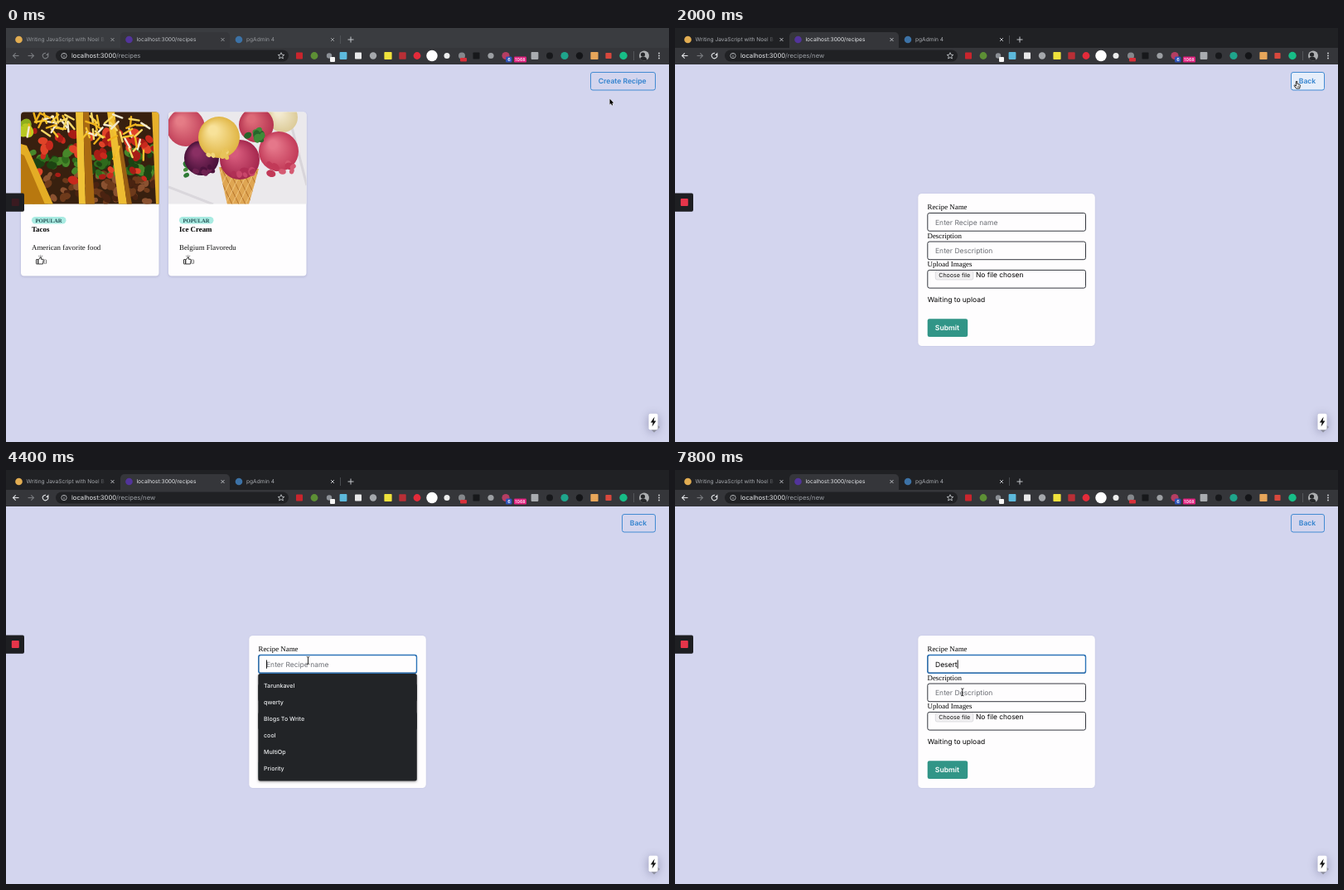
An HTML page with a canvas for the animation above (8 s loop, 800x500 px).

```html
<!DOCTYPE html>
<html lang="en">
<head>
<meta charset="utf-8">
<title>Recipes</title>
<style>
html, body { margin: 0; width: 100%; height: 100%; overflow: hidden; background: #d3d5ee; }
canvas { display: block; width: 800px; height: 500px; }
</style>
</head>
<body>
<canvas id="stage" width="800" height="500"></canvas>
<script>
const ctx = document.getElementById('stage').getContext('2d');
const LOOP = 8000, STEP = 200;
const SANS = 'Inter, "Open Sans", sans-serif';
const SERIF = '"Liberation Serif", "Noto Serif", serif';
const BLUE = '#3182ce';

// ---------- helpers ----------
function text(str, x, y, size, color, family = SANS, weight = 400) {
  ctx.font = `${weight} ${size}px ${family}`;
  ctx.fillStyle = color;
  ctx.fillText(str, x, y);
  return ctx.measureText(str).width;
}
function box(x, y, w, h, r, fill, stroke, line = 1) {
  ctx.beginPath();
  ctx.roundRect(x, y, w, h, r);
  paint(fill, stroke, line);
}
function disc(x, y, r, fill, stroke, line = 1) {
  ctx.beginPath();
  ctx.arc(x, y, r, 0, Math.PI * 2);
  paint(fill, stroke, line);
}
function poly(points, fill, stroke, line = 1, open = false) {
  ctx.beginPath();
  points.forEach(([x, y]) => ctx.lineTo(x, y));
  if (!open) ctx.closePath();
  paint(fill, stroke, line);
}
function paint(fill, stroke, line) {
  if (fill) { ctx.fillStyle = fill; ctx.fill(); }
  if (stroke) { ctx.strokeStyle = stroke; ctx.lineWidth = line; ctx.stroke(); }
}
function line(x1, y1, x2, y2, color, width = 1) {
  poly([[x1, y1], [x2, y2]], null, color, width, true);
}
function shadow(color, blur, dy, draw) {
  ctx.save();
  ctx.shadowColor = color;
  ctx.shadowBlur = blur;
  ctx.shadowOffsetY = dy;
  draw();
  ctx.restore();
}
function clipped(x, y, w, h, r, draw) {
  ctx.save();
  ctx.beginPath();
  ctx.roundRect(x, y, w, h, r);
  ctx.clip();
  draw();
  ctx.restore();
}
function at(x, y, draw) {
  ctx.save();
  ctx.translate(x, y);
  draw();
  ctx.restore();
}
function seeded(seed) {
  return () => (seed = (seed * 16807) % 2147483647) / 2147483647;
}

// ---------- browser window ----------
function drawTab(x, title, icon, color, focused) {
  disc(x + 4.5, 14, 4.3, icon);
  text(title, x + 13.5, 16.4, 6.6, color);
  const cx = x + 117.5, ink = focused ? '#c3c6ca' : '#9a9da1';
  line(cx - 2, 12, cx + 2, 16, ink, 0.9);
  line(cx + 2, 12, cx - 2, 16, ink, 0.9);
}
function drawArrow(x, dir, color) {
  line(x - 3.5, 33.5, x + 3.5, 33.5, color, 1.1);
  poly([[x + dir * 0.3, 30.3], [x + dir * 3.5, 33.5], [x + dir * 0.3, 36.7]], null, color, 1.1, true);
}
function drawStar(x, y, r, color) {
  const pts = Array.from({ length: 10 }, (_, i) => {
    const a = i * Math.PI / 5 - Math.PI / 2, d = i % 2 ? r * 0.45 : r;
    return [x + d * Math.cos(a), y + d * Math.sin(a)];
  });
  poly(pts, null, color, 0.8);
}
function drawExtensions() {
  const squares = [[354, '#c9252d', 4], [407, '#5db9dc', 4.4], [425, '#e9e9ea', 4], [461, '#efe13c', 4.6],
    [478.5, '#b92f36', 4.2], [567.5, '#17181b', 4], [638, '#a9acb0', 4.4], [710, '#e7a65a', 4.6], [727, '#d8483d', 3.6]];
  const discs = [[372, '#5d8f35', 4.4], [390, '#8d9197', 3.2], [443, '#a5a8ac', 4.2], [496, '#e42b3a', 4.4],
    [514, '#ffffff', 6.7], [532, '#eceded', 3.5], [550, '#85888c', 4], [585, '#9c9fa3', 3.6],
    [603, '#b53e62', 4.6], [656, '#17181b', 4], [674, '#1fa58c', 4.6], [692, '#141518', 4.2], [745, '#17bd87', 4.7]];
  squares.forEach(([x, color, r]) => box(x - r, 33.5 - r, r * 2, r * 2, 0.8, color));
  discs.forEach(([x, color, r]) => disc(x, 33.5, r, color));
  box(391, 35, 6, 6, 1, '#f5f5f5');
  box(548, 36, 8, 4.5, 1, '#d8313b');
  box(603, 34.5, 7.5, 7, 1.5, '#2d52b8');
  text('6', 605.2, 40.2, 5.6, '#fff', SANS, 600);
  box(613, 34.5, 15, 7, 1.2, '#e0217f');
  text('1068', 614.3, 40.1, 5.3, '#fff', SANS, 500);
  line(757.5, 28, 757.5, 39, '#5c5f63', 0.8);
  clipped(764, 27.5, 12, 12, 6, () => {
    box(764, 27, 12, 13, 0, '#aeb0b2');
    disc(768.5, 32, 2.6, '#26272a');
    disc(769, 39, 4.5, '#26272a');
  });
  [-3, 0, 3].forEach(d => disc(788, 33.5 + d, 0.9, '#d5d7da'));
}
function drawBrowser(t) {
  const focused = t >= 1000;
  const frame = focused ? '#202124' : '#3a3c40';
  const title = focused ? '#a8abb0' : '#94979b';
  box(0, 0, 800, 44, 0, frame);
  box(0, 24, 800, 20, 0, '#35363a');
  box(138, 5, 132, 20, [5, 5, 0, 0], '#35363a');
  drawTab(11, 'Writing JavaScript with Noel B', '#e2ad52', title, focused);
  const fade = ctx.createLinearGradient(108, 0, 122, 0);
  fade.addColorStop(0, frame + '00');
  fade.addColorStop(1, frame);
  box(108, 8, 16, 12, 0, fade);
  drawTab(144, 'localhost:3000/recipes', '#52349b', focused ? '#e3e5e8' : '#b9bcc0', focused);
  drawTab(276.5, 'pgAdmin 4', '#3c72a6', title, focused);
  line(403.5, 9, 403.5, 19, '#55585c', 0.8);
  line(412.5, 14, 419.5, 14, '#c3c6ca', 1);
  line(416, 10.5, 416, 17.5, '#c3c6ca', 1);

  const nav = focused ? '#e0e2e5' : '#7b7e82';
  drawArrow(12, -1, nav);
  drawArrow(30, 1, '#77797d');
  ctx.beginPath();
  ctx.arc(47.5, 33.5, 3.2, -0.5, 4.9);
  ctx.strokeStyle = nav;
  ctx.lineWidth = 1.1;
  ctx.stroke();
  poly([[51.4, 29.6], [51.4, 33], [48, 33]], nav);

  box(60, 26.5, 281, 14, 7, '#202124');
  disc(70, 33.5, 3.2, null, '#c4c7cb', 0.8);
  line(70, 33, 70, 35.3, '#c4c7cb', 0.8);
  disc(70, 31.8, 0.5, '#c4c7cb');
  const w = text('localhost:3000', 79, 36.4, 7.65, '#e8eaed');
  text(t < 2000 ? '/recipes' : '/recipes/new', 79 + w, 36.4, 7.65, '#9ea2a8');
  drawStar(332, 33.7, 4, '#cfd2d6');
  drawExtensions();
}

// ---------- pictures ----------
function scatter(rnd, n, [x, y, w, h], colors, size) {
  for (let i = 0; i < n; i++) {
    const px = x + rnd() * w, py = y + rnd() * h, r = size * (0.6 + rnd() * 0.6);
    ctx.beginPath();
    ctx.ellipse(px, py, r, r * 0.75, rnd() * 3, 0, 7);
    paint(colors[i % colors.length]);
  }
}
function shreds(rnd, n, [x, y, w, h], colors) {
  ctx.lineCap = 'round';
  for (let i = 0; i < n; i++) {
    const px = x + rnd() * w, py = y + rnd() * h, a = rnd() * 3.1;
    line(px, py, px + Math.cos(a) * 12, py + Math.sin(a) * 12, colors[i % colors.length], 2.4);
  }
  ctx.lineCap = 'butt';
}
function drawTacos() {
  const rnd = seeded(77);
  const reds = ['#c8291d', '#e04328', '#a81c16'], greens = ['#2f6a1c', '#47872a', '#1d4312'];
  const browns = ['#6e3a1b', '#8a5130', '#4a2311'], cheese = ['#f5c22d', '#f7d866', '#f2ead0', '#eeb11c'];
  box(18, 101, 167, 112, 0, '#38200f');
  const fillings = [[32, 88], [98, 136], [146, 180]];
  fillings.forEach(([a, b]) => {
    const w = b - a;
    scatter(rnd, 26, [a, 176, w, 34], browns, 5);
    scatter(rnd, 22, [a, 146, w, 32], greens, 6);
    scatter(rnd, 12, [a, 122, w, 34], reds, 6);
    scatter(rnd, 3, [a, 170, w, 16], reds, 5.5);
  });
  poly([[18, 140], [25, 142], [57, 213], [18, 213]], '#e4ad25');
  poly([[18, 152], [22, 154], [47, 213], [18, 213]], '#b8780f');
  poly([[84, 101], [93, 101], [96, 213], [88, 213]], '#f0c236');
  poly([[93, 101], [100, 101], [107, 213], [96, 213]], '#a96a12');
  poly([[122, 101], [131, 101], [146, 213], [136, 213]], '#edbc31');
  poly([[131, 110], [136, 118], [152, 213], [146, 213]], '#9a5f14');
  poly([[176, 101], [185, 101], [185, 213], [181, 213]], '#e6b02b');
  scatter(rnd, 5, [18, 112, 8, 22], ['#b9c921', '#8fae1c'], 8);
  shreds(rnd, 26, [26, 101, 50, 24], cheese);
  shreds(rnd, 18, [96, 101, 34, 30], cheese);
  shreds(rnd, 22, [126, 106, 42, 42], cheese);
}
function drawScoop(x, y, r, light, dark) {
  const g = ctx.createRadialGradient(x - r * 0.3, y - r * 0.35, r * 0.2, x, y, r);
  g.addColorStop(0, light);
  g.addColorStop(1, dark);
  disc(x, y, r, g);
}
function drawIceCream() {
  const rnd = seeded(31);
  box(196, 101, 167, 112, 0, '#ebe9ec');
  line(340, 101, 363, 190, '#d8d5da', 3);
  line(196, 192, 250, 213, '#dad7dc', 3);
  drawScoop(334, 108, 18, '#f3ead0', '#dccb98');
  drawScoop(217, 120, 23, '#e57c86', '#c2425b');
  drawScoop(302, 117, 21, '#dd6a78', '#b63450');
  drawScoop(329, 149, 24, '#e5778a', '#c23a58');
  scatter(rnd, 8, [318, 164, 30, 12], ['#c23a58', '#d55a72'], 5);
  scatter(rnd, 10, [216, 148, 20, 36], ['#2e7a35', '#468f3b'], 5);
  scatter(rnd, 9, [288, 122, 22, 14], ['#3f8a38', '#26662b'], 5);
  drawScoop(236, 157, 21, '#8a2f63', '#461038');
  scatter(rnd, 6, [224, 168, 26, 8], ['#4c123c', '#6d2150'], 5);
  clippedCone();
  drawScoop(282, 159, 24, '#d65a7b', '#a4274d');
  scatter(rnd, 8, [264, 172, 36, 7], ['#b02f55', '#c9466a'], 5);
  drawScoop(257, 132, 25, '#f8e29a', '#e0b544');
  scatter(rnd, 7, [238, 148, 32, 8], ['#e8c35a', '#f1d57b'], 5);
}
function clippedCone() {
  ctx.save();
  poly([[257, 168], [305, 170], [293, 213], [267, 213]], '#dfa653');
  ctx.clip();
  for (let i = -3; i < 10; i++) {
    line(250 + i * 8, 165, 274 + i * 8, 215, '#b4732c', 1);
    line(264 + i * 8, 165, 240 + i * 8, 215, '#f0c57e', 1);
  }
  ctx.restore();
}

// ---------- pages ----------
function drawButton(x, label, hover) {
  box(x, 53.5, 783.5 - x, 21.5, 2.5, hover ? '#e6eefa' : null, BLUE, 0.9);
  text(label, x + 9.3, 67, 8.55, BLUE, SANS, 600);
}
function drawThumb(x, y) {
  box(x, y + 4, 2.2, 5.5, 0.4, null, '#222', 0.9);
  poly([[2.2, 4.4], [4.2, 3], [4.6, 1.2], [5.9, 1.2], [5.9, 3.8], [8.6, 3.8], [8.6, 5.4], [8, 9.5], [2.2, 9.5]]
    .map(([a, b]) => [x + a, y + b]), null, '#222', 0.9);
  line(x + 3, y - 0.6, x + 3.5, y + 0.4, '#222', 0.7);
  line(x + 5.2, y - 1.2, x + 5.2, y, '#222', 0.7);
  line(x + 7.4, y - 0.6, x + 6.9, y + 0.4, '#222', 0.7);
}
function drawCard(x, name, note, picture) {
  shadow('rgba(60,60,110,.22)', 3, 1, () => box(x, 101.5, 166.5, 198, 4, '#fefdfe'));
  clipped(x, 101.5, 166.5, 111, [4, 4, 0, 0], picture);
  box(x + 13, 228, 41.5, 8.5, 4.2, '#a9ebe2');
  text('POPULAR', x + 17.4, 234.5, 6.67, '#234e52', SERIF, 700);
  text(name, x + 13, 246.2, 8.89, '#000', SERIF, 700);
  text(note, x + 13, 268, 8.89, '#111', SERIF);
  drawThumb(x + 18.5, 275.5);
  text('0', x + 27.2, 284.6, 8.4, '#444', SERIF);
}
function drawList(t) {
  drawButton(705.5, 'Create Recipe', t >= 1200);
  drawCard(18, 'Tacos', 'American favorite food', drawTacos);
  drawCard(196, 'Ice Cream', 'Belgium Flavoredu', drawIceCream);
}
function drawField(label, y, hint) {
  text(label, 304.5, y - 4.3, 8.89, '#000', SERIF);
  box(304.8, y, 190.7, 21.7, 2.3, '#fefdfe', '#34373e', 1);
  if (hint) text(hint, 314, y + 14.3, 8.5, '#6c6f75');
}
function drawSuggestions() {
  shadow('rgba(0,0,0,.4)', 3, 1, () => box(304.3, 246, 191.5, 129.5, 2.5, '#222427'));
  ['Tarunkavel', 'qwerty', 'Blogs To Write', 'cool', 'MultiOp', 'Priority']
    .forEach((s, i) => text(s, 311, 263.2 + i * 20, 7.1, '#eceef0', SANS, 500));
}
function drawForm(t) {
  const focused = t >= 3800;
  const typed = 'Desert'.slice(0, t < 6000 ? 0 : 1 + (t - 6000) / STEP);
  const caret = focused && !(t >= 4000 && t < 4400) && !(t >= 5000 && t < 5600);
  drawButton(743.5, 'Back', t < 2600);
  shadow('rgba(60,60,110,.12)', 2, 0, () => box(293.3, 200, 213.5, 184, 4.5, '#fefdfe'));
  drawField('Recipe Name', 223.5, typed ? '' : 'Enter Recipe name');
  drawField('Description', 258, 'Enter Description');
  drawField('Upload Images', 292.4);
  box(314.3, 293.4, 45.5, 10.6, 2, '#f1f0f2', '#d2d2d6', 0.7);
  text('Choose file', 318.2, 301, 7.1, '#111');
  text('No file chosen', 363, 301.2, 8.45, '#000');
  text('Waiting to upload', 304.7, 331.4, 8.45, '#000');
  box(304.7, 351.3, 48.5, 21.7, 2.3, '#319587');
  text('Submit', 313.8, 365.1, 8.6, '#fff', SANS, 600);
  if (focused) box(304.8, 223.5, 190.7, 21.7, 2.3, null, '#2d74b8', 1.4);
  const w = typed ? text(typed, 314, 237.8, 8.5, '#000') : 0;
  if (caret) line(314.5 + w, 229.5, 314.5 + w, 239.8, '#000', 0.9);
  if (focused && t < 6200) drawSuggestions();
}
function drawRecorder(t) {
  box(-4, 199.5, 26, 22.3, 2, '#1e1f22');
  box(6.8, 206, 9, 9, 1, t < 400 ? '#3a1a20' : '#e5354a');
}
function drawBadge() {
  poly([[782, 476], [789, 482], [782, 488.5], [775.5, 482]], '#9c9ea8');
  shadow('rgba(60,60,100,.45)', 12, 2, () => box(775.5, 465.8, 11, 19.5, 2, '#fff'));
  poly([[782.6, 469.5], [777.8, 476.6], [780.6, 476.6], [779.6, 481.6], [784.4, 474.4], [781.6, 474.4]], '#111');
}

// ---------- pointer ----------
const PATH = [[0, 728.5, 85.5], [200, 728.5, 85.5], [800, 742.5, 61.5], [1400, 750, 64.3], [1800, 750, 64.3],
  [2200, 750.5, 64.8], [2600, 750.5, 64.8], [3800, 364.5, 230], [7200, 364.5, 230], [7800, 346.8, 268.3], [8000, 346.8, 268.3]];

function pointerAt(t) {
  const i = PATH.findIndex((p, k) => k > 0 && t <= p[0]);
  const [t0, x0, y0] = PATH[i - 1], [t1, x1, y1] = PATH[i];
  const u = (t - t0) / (t1 - t0), e = u * u * (3 - 2 * u);
  return [x0 + (x1 - x0) * e, y0 + (y1 - y0) * e];
}
function drawPointer(t) {
  if (t >= 6000 && t < 7400) return;
  const [x, y] = pointerAt(t);
  at(x, y, () => {
    if (t >= 1200 && t <= 2600) {
      poly([[-0.9, 0], [0.5, 0], [0.7, 3], [3.5, 3.7], [4.2, 4.6], [3.4, 8.5], [-0.6, 8.5], [-3.3, 5], [-2.6, 4.4], [-0.9, 5.6]],
        '#fff', '#111', 0.9);
      line(1, 5, 1, 7.3, '#111', 0.5);
      line(2.4, 5, 2.4, 7.3, '#111', 0.5);
    } else if (t >= 3600) {
      line(0, -4, 0, 4.2, '#111', 0.9);
      [-1, 1].forEach(s => poly([[-1.7, s * 4.6], [0, s * 3.8], [1.7, s * 4.6]], null, '#111', 0.8, true));
    } else {
      poly([[0, 0], [0, 6.9], [1.5, 5.6], [2.6, 8.1], [3.7, 7.6], [2.7, 5.2], [4.7, 5]], '#000', '#fff', 1);
      poly([[0, 0], [0, 6.9], [1.5, 5.6], [2.6, 8.1], [3.7, 7.6], [2.7, 5.2], [4.7, 5]], '#000');
    }
  });
}

// ---------- loop ----------
function draw(t) {
  ctx.textRendering = 'geometricPrecision';
  box(0, 0, 800, 500, 0, '#d3d5ee');
  (t < 2000 ? drawList : drawForm)(t);
  drawBadge();
  drawRecorder(t);
  drawBrowser(t);
  drawPointer(t);
}
const start = performance.now();
function tick() {
  const t = (performance.now() - start) % LOOP;
  draw(Math.floor(t / STEP) * STEP);
  requestAnimationFrame(tick);
}
tick();
</script>
</body>
</html>
```
